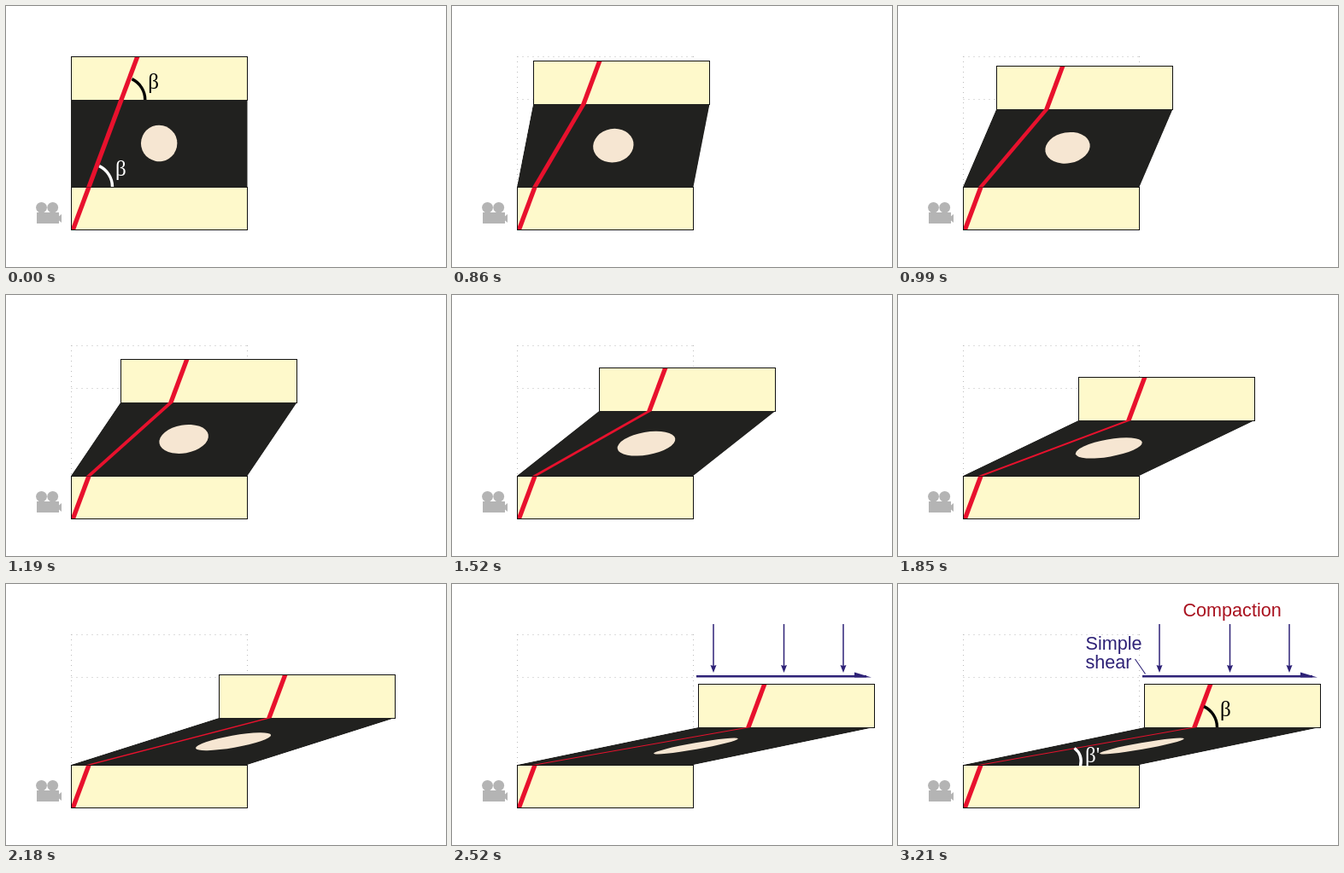
Recreate the animation shown at these times as an HTML page with a canvas. Size 515 by 306 pixels, loop 4.35 s.

```html
<!DOCTYPE html>
<html lang="en">
<head>
<meta charset="utf-8">
<title>Shear and compaction</title>
<style>
  html, body { margin: 0; width: 100%; height: 100%; overflow: hidden; background: #fff; }
  canvas { display: block; width: 515px; height: 306px; }
</style>
</head>
<body>
<canvas id="stage" width="515" height="306"></canvas>
<script>
const ctx = document.getElementById('stage').getContext('2d');

const LOOP = 4350;
const STEP_TIMES = [860, 990, 1190, 1320, 1520, 1720, 1850, 2050, 2180, 2380, 2520];
const LABELS_AT = 3210;

const LEFT = 76, WIDTH = 206, TOP = 59, BOTTOM = 262;
const BAND_TOP = 110, BAND_BOTTOM = 212, BAND = BAND_BOTTOM - BAND_TOP;
const SHIFT_X = 212, SHIFT_Y = 58;

const INK = '#21211f', CREAM = '#fef9cb', SKIN = '#f6e6d2', RED = '#e8112d';
const BLUE = '#2e2277', CRIMSON = '#a9121f', GREY = '#b4b4b4';
const SERIF = '25px "Liberation Serif", serif';
const SANS = '21.6px "Liberation Sans", sans-serif';

function line(points, color, width) {
  ctx.beginPath();
  points.forEach(([x, y]) => ctx.lineTo(x, y));
  ctx.strokeStyle = color;
  ctx.lineWidth = width;
  ctx.stroke();
}

function polygon(points, color) {
  ctx.beginPath();
  points.forEach(([x, y]) => ctx.lineTo(x, y));
  ctx.fillStyle = color;
  ctx.fill();
}

function oval(x, y, rx, ry, angle, color) {
  ctx.beginPath();
  ctx.ellipse(x, y, rx, ry, angle, 0, Math.PI * 2);
  ctx.fillStyle = color;
  ctx.fill();
}

function text(str, x, y, color, font) {
  ctx.font = font;
  ctx.fillStyle = color;
  ctx.fillText(str, x, y);
}

// The straight marker line in undeformed coordinates
function marker() {
  const x = y => 78.5 + (BOTTOM - y) * 0.3715;
  line([[x(280), 280], [x(40), 40]], RED, 5.3);
}

function clipped(x, y, w, h, draw) {
  ctx.save();
  ctx.beginPath();
  ctx.rect(x, y, w, h);
  ctx.clip();
  draw();
  ctx.restore();
}

function block(top, bottom, dx, dy) {
  const height = bottom - top;
  ctx.save();
  ctx.translate(dx, dy);
  ctx.fillStyle = CREAM;
  ctx.fillRect(LEFT, top, WIDTH, height);
  clipped(LEFT, top, WIDTH + 1, height + 1, marker);
  ctx.strokeStyle = '#111';
  ctx.lineWidth = 1;
  ctx.strokeRect(LEFT + 0.5, top + 0.5, WIDTH, height);
  ctx.restore();
}

function band(dx, dy) {
  const scale = (BAND - dy) / BAND, shear = dx / BAND;
  ctx.save();
  ctx.transform(1, 0, -shear, scale, BAND_BOTTOM * shear, BAND_BOTTOM * (1 - scale));
  clipped(LEFT, BAND_TOP, WIDTH + 0.5, BAND + 0.5, () => {
    ctx.fillStyle = INK;
    ctx.fillRect(LEFT, BAND_TOP, WIDTH + 1, BAND + 1);
    marker();
  });
  ctx.restore();
}

// The round body stretches and flattens at a constant tilt
function strainEllipse(p) {
  const mix = (a, b) => a + (b - a) * p;
  oval(mix(179.2, 285.4), mix(161, 190), mix(21.2, 50), mix(21.2, 3.9), -Math.PI / 18, SKIN);
}

function angleMark(x, y, color) {
  ctx.beginPath();
  ctx.arc(x, y, 27, -Math.PI * 0.358, 0);
  ctx.strokeStyle = color;
  ctx.lineWidth = 3.4;
  ctx.stroke();
  text('β', x + 30.5, y - 13, color, SERIF);
}

function ghostOutline() {
  const right = LEFT + WIDTH + 0.5, left = LEFT + 0.5;
  ctx.setLineDash([1, 5]);
  line([[left, TOP + 0.5], [right, TOP + 0.5]], '#bbb', 1);
  line([[left, BAND_TOP - 0.5], [right, BAND_TOP - 0.5]], '#bbb', 1);
  line([[left, TOP], [left, BAND_BOTTOM]], '#bbb', 1);
  line([[right, TOP], [right, BAND_BOTTOM]], '#bbb', 1);
  ctx.setLineDash([]);
}

function camera() {
  oval(41.5, 236.3, 6.4, 6.4, 0, GREY);
  oval(54.7, 236.3, 6.4, 6.4, 0, GREY);
  ctx.fillStyle = GREY;
  ctx.fillRect(36, 242, 26, 13);
  polygon([[59, 249], [65, 244], [65, 254]], GREY);
}

function arrows() {
  for (const x of [306, 388.5, 458]) {
    line([[x, 47], [x, 97]], BLUE, 1.5);
    polygon([[x - 3.5, 95], [x, 96], [x + 3.5, 95], [x, 104]], BLUE);
  }
  line([[286, 108.3], [485, 108.3]], BLUE, 2.4);
  polygon([[471, 103.5], [491, 109.5], [471, 109.5]], BLUE);
}

function labels() {
  text('Compaction', 333.5, 38, CRIMSON, SANS);
  text('Simple', 219.5, 77, BLUE, SANS);
  text('shear', 219.5, 99, BLUE, SANS);
  line([[277.5, 88], [289.5, 105.5]], BLUE, 1.1);
  angleMark(346.5, 168, '#000');
  ctx.beginPath();
  ctx.moveTo(206.5, 192.5);
  ctx.quadraticCurveTo(216.5, 200, 213.5, 213.5);
  ctx.strokeStyle = '#fff';
  ctx.lineWidth = 3.4;
  ctx.stroke();
  text("β'", 219, 209, '#fff', SERIF);
}

function draw(t) {
  const step = STEP_TIMES.filter(at => t >= at).length;
  const progress = step / STEP_TIMES.length;
  const dx = Math.round(SHIFT_X * progress), dy = Math.round(SHIFT_Y * progress);

  ctx.fillStyle = '#fff';
  ctx.fillRect(0, 0, 515, 306);
  camera();
  if (step > 0) ghostOutline();
  block(BAND_BOTTOM, BOTTOM, 0, 0);
  block(TOP, BAND_TOP, dx, dy);
  band(dx, dy);
  strainEllipse(progress);

  if (step === 0) {
    angleMark(135.8, BAND_TOP, '#000');
    angleMark(97.5, BAND_BOTTOM, '#fff');
  }
  if (step === STEP_TIMES.length) arrows();
  if (t >= LABELS_AT) labels();
}

const start = performance.now();
function tick() {
  draw((performance.now() - start) % LOOP);
  requestAnimationFrame(tick);
}
tick();
</script>
</body>
</html>
```
